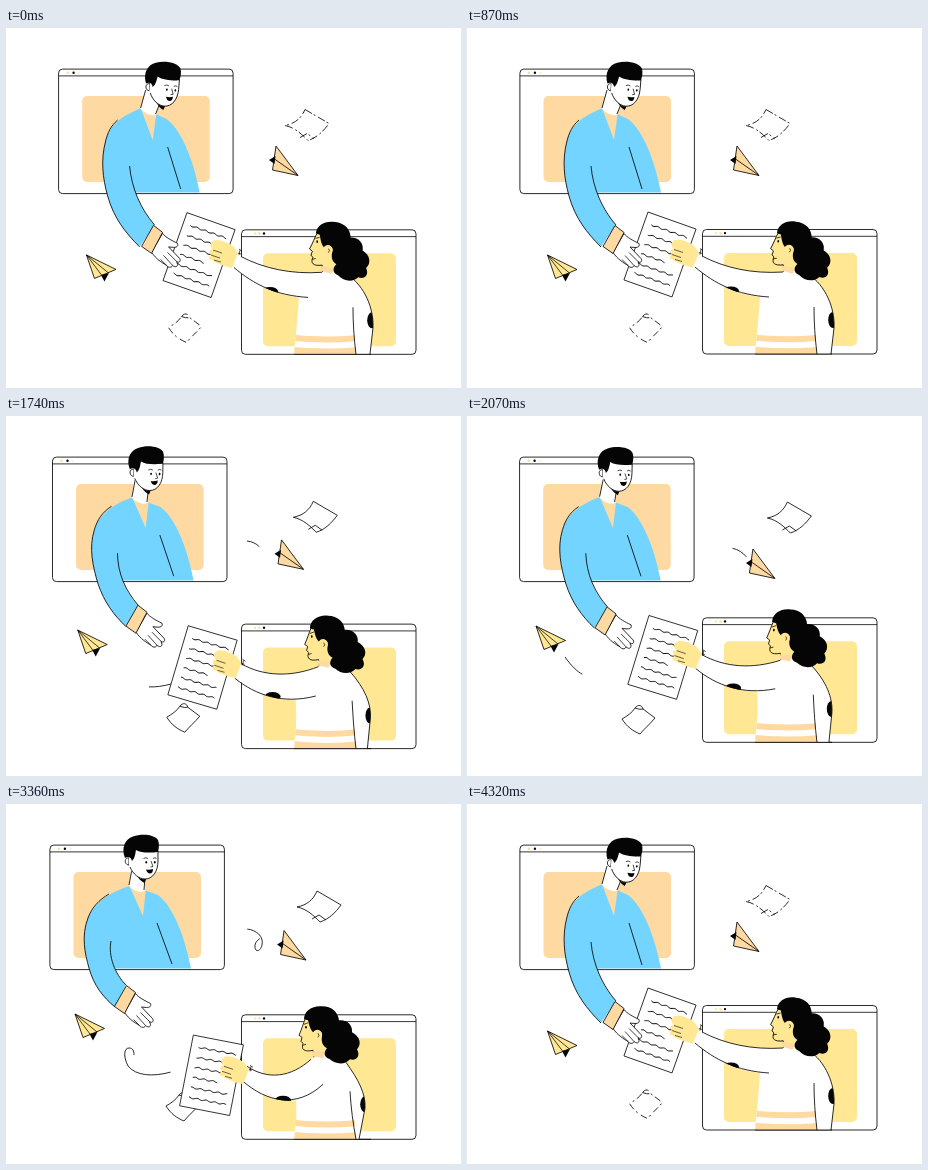
These frames come from a looping animation (455x360 px, 4.35 s). An HTML page with a canvas:

```html
<!DOCTYPE html>
<html lang="en">
<head>
<meta charset="utf-8">
<title>Sharing a document</title>
<style>
  html, body { margin: 0; width: 100%; height: 100%; overflow: hidden; background: #fff; }
  canvas { display: block; }
</style>
</head>
<body>
<canvas id="stage" width="455" height="360"></canvas>
<script>
const ctx = document.getElementById('stage').getContext('2d');
const LOOP = 4350, CYCLE = 1520;
const INK = '#050505', BLUE = '#72d4ff', PEACH = '#ffd9a2', YELLOW = '#ffe794', WHITE = '#fff';

// Keyframe tracks: rows of [time, value, value...]
const SLIDE = [[0, .03], [105, .55], [210, .68], [320, 1], [370, 1.03], [510, .1], [560, .02], [640, 0]];
const REACH = [[0, .01], [105, .35], [210, .75], [320, 2], [360, 2], [510, 1], [550, .7], [640, .22], [740, 0]];
const DART_R = [[0, -15.5, -15], [320, -7.5, -6.5], [500, 0, 0], [560, .5, 0], [760, -15.5, -15]];
const DART_L = [[0, 11.5, 17], [290, 0, 0], [570, 0, 0], [760, 11.5, 17]];
const PAGE_R = [[0, -21, -4.5], [320, -9, 1], [500, 0, 0], [570, .5, 0], [760, -21, -4.5]];
const PAGE_L = [[0, 7.5, -3.5], [320, 5, -1], [500, 0, 0], [570, 0, 0], [760, 7.5, -3.5]];
const TAIL = [[180, 0, 0], [320, 0, .62], [430, .4, 1], [510, .66, 1], [550, .78, 1], [640, 1, 1]];

// Poses: together, parted, far apart
const MAN_BODY = [
  'M136 80 C118 87 104 96 100 113 C95 132 97 150 102 168 C108 190 120 205 134 219 L149 197 C140 187 134 176 130 164.6 L194 164.6 C189 138 178 104 161 91 L150 86 Z',
  'M133 81 C116 87 100 96 94 114 C88 132 93 152 98 168 C104 185 113 198 125 209 L137 188 C130 181 125 173 122 164.6 L194 164.6 C189 138 178 104 161 91 L147 86 Z',
  'M133 82 C116 87 98 97 91 114 C84 132 88 150 92 164 C97 182 106 193 118 203 L129 181 C124 176 120 171 118 164.6 L194 164.6 C189 138 178 104 161 91 L147 86 Z'];
const MAN_LINES = [
  'M112 92 C105 98 102 105 100 113 C95 132 97 150 102 168 C108 190 120 205 134 219 M149 197 C135 181 126 160 124 138 M162 119 L175 161',
  'M112 90 C102 96 97 104 94 114 C88 132 93 152 98 168 C104 185 113 198 125 209 M137 188 C125 174 117 158 117 137 M160 119 L174 160',
  'M112 90 C102 96 95 103 91 114 C84 132 88 150 92 164 C97 182 106 193 118 203 M129 181 C118 170 111 152 114 137 M160 119 L175 160'];
const NECK = [
  'M140 62 L135 81 C140 86 146 88 150 87 L154 76 Z',
  'M134 60 L132 82 C137 87 143 89 148 87 L148 72 Z',
  'M134 61 L132 82 C137 87 143 89 148 87 L148 73 Z'];
const NECK_LINES = [
  'M140 62 L135 80 M154 76 L150 86',
  'M135 64 L132 81 M148 73 L147 86',
  'M135 65 L132 81 M148 74 L147 86'];
const COLLAR = [
  'M135 80 L151 84 L147 112 Z',
  'M132 81 L149 84 L146 112 Z',
  'M132 81 L149 84 L146 112 Z'];
const MAN_HEAD = [[12.5, 4, 5], [.8, 0, 0], [0, 1, 0]];
const MAN_HAND = [[11, 9.5], [0, 0], [-7.5, -6.5]];
const GIRL_BODY = [
  'M235 228 C258 240 285 246 316 244 L322 241 L344 248 C362 262 368 285 367 300 L364 326 L288 326 C290 305 292 285 293 269 C268 266 248 256 228 239 Z',
  'M235 243 C258 256 285 256 312 244 L320 240 L344 249 C358 266 365 280 364 295 L361 326 L288 326 C290 308 291 292 289 278 C266 280 247 270 229 258 Z',
  'M241 253 C262 267 285 264 305 246 L316 240 L340 249 C352 266 360 280 359 295 L353 326 L288 326 C290 312 291 300 290 287 C270 290 255 281 237 268 Z'];
const GIRL_LINES = [
  'M235 228 C258 240 285 246 316 244 M228 239 C248 256 270 267 302 269 M344 248 C362 262 368 285 367 300 L364 326 M347 279 C347 295 348 310 350 326',
  'M235 243 C258 256 285 256 312 244 M229 258 C250 275 278 284 311 274 M344 249 C358 266 365 280 364 295 L361 326 M346 278 C347 295 348 310 350 326',
  'M241 253 C262 267 285 264 305 246 M237 268 C260 288 290 296 317 271 M340 249 C352 266 360 280 359 295 L353 326 M344 278 C345 295 347 310 350 326'];
const GIRL_HEAD = [[5.5, 1, 5], [0, 0, 0], [-5, 0, 0]];
const GIRL_HAND = [[-4, -18.5], [0, 0], [7, 13]];
const PATCHES = [[264, 263, 366, 292], [267, 275.5, 364, 293], [277, 287, 359, 291]];
const SHEET = [[193, 226.5, 19.5], [197, 247.5, 16], [205.5, 262, 11]];

function track(t, rows) {
  if (t <= rows[0][0]) return rows[0].slice(1);
  for (let i = 1; i < rows.length; i++) {
    const a = rows[i - 1], b = rows[i];
    if (t < b[0]) return a.slice(1).map((v, k) => v + (b[k + 1] - v) * (t - a[0]) / (b[0] - a[0]));
  }
  return rows[rows.length - 1].slice(1);
}

function pose(list, r) {
  const i = r < 1 ? 0 : 1;
  return list[i].map((v, k) => v + (list[i + 1][k] - v) * (r - i));
}

function posePath(list, r) {
  const i = r < 1 ? 0 : 1, next = list[i + 1].match(/[\d.]+/g);
  let k = 0;
  return list[i].replace(/[\d.]+/g, v => (+v + (next[k++] - v) * (r - i)).toFixed(2));
}

function fill(d, color) { ctx.fillStyle = color; ctx.fill(new Path2D(d)); }
function line(d, width = .85) { ctx.lineWidth = width; ctx.strokeStyle = INK; ctx.stroke(new Path2D(d)); }
function shape(d, color, width) { fill(d, color); line(d, width); }
function oval(x, y, rx, ry, color) {
  ctx.beginPath();
  ctx.ellipse(x, y, rx, ry, 0, 0, 7);
  ctx.fillStyle = color;
  ctx.fill();
}
function at([x, y, deg = 0], draw, px = 0, py = 0) {
  ctx.save();
  ctx.translate(x + px, y + py);
  ctx.rotate(deg * Math.PI / 180);
  ctx.translate(-px, -py);
  draw();
  ctx.restore();
}
function box(x, y, w, h, r, color) {
  ctx.beginPath();
  ctx.roundRect(x, y, w, h, r);
  ctx.fillStyle = color;
  ctx.fill();
}

function frameWindow(x, y, dots) {
  box(x, y, 174.5, 124.5, 4, WHITE);
  ctx.strokeStyle = INK;
  ctx.lineWidth = .85;
  ctx.stroke();
  line(`M${x} ${y + 6.8} h174.5`, .8);
  dots.forEach(([dx, c]) => oval(x + dx, y + 3.6, 1.2, 1.2, c));
}

function manHead() {
  shape('M132 60 C127 60 127 52 132 53 Z', WHITE);
  fill('M132 44 L132 61 C134 68 141 74 148 74 C156 74 161 66 161 56 L161 42 Z', WHITE);
  line('M133 62 C136 69 142 74 148 74 C156 74 161 66 161 56 L161 46');
  fill('M128 53 C124 43 128 34 136 31.5 C146 28 158 30 161 35 C162.500 39 162 43 161 47 C152 48 144 48 139 45 C138 50 138 53 135 56 C134 52 131 51 128 53 Z', INK);
  line('M146.500 53.500 Q149 52 151 53.500 M156 53.500 Q158 52 159.500 53.500 M154 56 L156 61.500 L153.500 62', .7);
  oval(149.3, 57.3, .9, 1.2, INK);
  oval(157.8, 57.3, .9, 1.2, INK);
  fill('M149 64.500 Q152.500 65 156 64 Q156 68.500 152.500 68.500 Q150 68 149 64.500 Z', INK);
  fill('M140 71 C143 74 146 74.500 149 74 L147.500 78 C144 76 142 74 140 71 Z', INK);
}

function manHand() {
  shape('M146 196 C149 200 155 203 161 206 C162 209 160 210 157 210 L152 209.500 L163 221 C165 224 162 226 160 224 L161 227 C161 230 158 230 156 228 C155 231 151 230 150 228 C145 225 140 222 135 215 Z', WHITE);
  line('M160 224 L151 215 M156 228 L147 218 M150 228 L144 222', .75);
  shape('M137 188 L146 195 L135 216 L125 209 Z', PEACH);
}

function girlFace() {
  fill('M307 202 C302 207 302 212 300 216 L298 222 L301 224 L300 228 L302 230 C300 236 303 239 311 238 L312 246 L326 246 L328 212 Z', YELLOW);
  line('M304 206 C302 211 301 215 298 222 L301 224 L300 228 L302 230 C300 236 303 239 312 237 L313 244');
  line('M303 211 L307 209.500 M301.500 232 L305 231', .75);
  oval(305, 214, .9, 1.3, INK);
}

function girlHair() {
  fill('M303 206 C303 197 312 192 321 193 C331 193 337 199 338 207 C346 206 352 212 351 219 C359 223 361 231 356 236 C360 243 355 248 349 246 C344 252 334 251 329 246 C322 244 323 238 326 235 C319 231 321 225 321 220 C319 216 315 215 312 219 C309 216 308 211 307 207 Z', INK);
  fill('M314 219 C317 215 322 218 321 223 C320 227 315 228 313 225', YELLOW);
  line('M317 220 Q319 222 317 224', .7);
}

function girlHand() {
  fill('M213 230 C220 230 226 233 231 236 L236 243 L230 258 C223 256 214 254 210 250 C206 250 206 247 209 245 C206 242 207 239 211 240 C207 236 208 232 213 230 Z', YELLOW);
  line('M211 240 L220 243 M209 245 L218 248 M212 250 L219 252', .6);
  line('M237 239 l3 2 M236 243 l3 1 m-1 -4 l-1 5', .7);
}

function sheet() {
  shape('M-25.500 -36 h51 v72 h-51 Z', WHITE, .75);
  [38, 37, 38, 25, 37, 38].forEach((w, i) => {
    ctx.beginPath();
    for (let x = 0; x <= w; x++) ctx.lineTo(x - 18, -25 + i * 10.2 + Math.sin(x * .7 + i) * .65);
    ctx.lineWidth = .9;
    ctx.stroke();
  });
}

function trail(d, [from, to], length) {
  if (to - from < .01) return;
  ctx.setLineDash([0, from * length, (to - from) * length, length * 2]);
  line(d);
  ctx.setLineDash([]);
}

function floaters(t) {
  const dashed = t < 130 || t > 700;
  const tail = track(t, TAIL);
  const page = (pos, d, extra, dash) => at(track(t, pos), () => {
    fill(d, WHITE);
    if (dashed) ctx.setLineDash(dash);
    line(d);
    line(extra);
  });
  page(PAGE_R, 'M320 86 L344 100 C338 108 332 114 323 117 C317 111 310 104 300 102 C310 100 316 95 320 86 Z',
    'M315 114 L322 110 L329 115', [8, 2, 2, 3]);
  page(PAGE_L, 'M168 292 C171 288 175 289 176 293 L188 302 C183 308 178 312 173 318 C166 315 160 311 155 303 C160 300 165 297 168 292 Z',
    'M168 292 Q173 294 176 293', [7, 4, 2, 3]);
  trail('M165 268 C147 273 130 272 122 262 C117 252 118 244 123 244 C127 244 128 247 128 251 C129 265 114 264 98 241', tail, 122);
  trail('M241 125 C250 126 258 132 256 141 C254 149 248 148 249 141 C250 135 258 132 262 132 C270 132 277 137 281 143', tail, 76);
  at(track(t, DART_L), () => {
    shape('M69 210 L98.500 224.500 L77 233.500 Z', YELLOW);
    line('M69 210 L84 230 M69 210 L91 228', .75);
    fill('M83.500 230 L91.500 228 L87 236.500 Z', INK);
  });
  at(track(t, DART_R), () => {
    shape('M285.500 133 L307.500 162.500 L282 157 Z', PEACH);
    line('M307.500 162.500 L284 146');
    fill('M278.500 147 L285 143 L284 151 Z', INK);
  });
}

function man(r) {
  frameWindow(52.9, 41.1, [[9, PEACH], [15, INK], [20.5, '#fff1d8']]);
  box(76.5, 68, 127.5, 86, 5, PEACH);
  fill(posePath(MAN_BODY, r), BLUE);
  fill(posePath(COLLAR, r), PEACH);
  fill(posePath(NECK, r), WHITE);
  line(posePath(NECK_LINES, r));
  line(posePath(MAN_LINES, r));
  at(pose(MAN_HEAD, r), manHead, 145, 52);
}

function girl(r) {
  frameWindow(235.5, 201.5, [[13.5, YELLOW], [18, PEACH], [22.5, INK]]);
  box(257, 225, 133, 93, 5, YELLOW);
  const head = pose(GIRL_HEAD, r), body = posePath(GIRL_BODY, r);
  const [ex, ey, sx, sy] = pose(PATCHES, r);
  at(head, girlFace, 325, 222);
  fill(body, WHITE);
  ctx.save();
  ctx.clip(new Path2D(body));
  fill('M280 306 Q318 310 349 307 L349 313 Q318 316 280 312 Z M280 318 Q318 322 350 319 L350 326 H280 Z', PEACH);
  oval(ex, ey, 8, 4.5, INK);
  oval(sx, sy, 4.8, 8, INK);
  ctx.restore();
  line(posePath(GIRL_LINES, r));
  line('M288 326 H365');
  at(head, () => {
    fill('M311 238 L325 239 L322 245 L312 243 Z', PEACH);
    girlHair();
  }, 325, 222);
}

function draw(now) {
  const t = now % LOOP % CYCLE;
  const [w] = track(t, SLIDE), [r] = track(t, REACH);
  const left = [-9 * w, 0], down = [0, 9.3 * w];
  ctx.fillStyle = WHITE;
  ctx.fillRect(0, 0, 455, 360);
  ctx.lineCap = 'butt';
  ctx.lineJoin = 'round';
  at(left, () => man(r));
  floaters(t);
  at(down, () => girl(r));
  at(down, () => at(pose(SHEET, r), sheet));
  at(left, () => at(pose(MAN_HAND, r), manHand));
  at(down, () => at(pose(GIRL_HAND, r), girlHand));
}

const start = performance.now();
function tick() {
  draw(performance.now() - start);
  requestAnimationFrame(tick);
}
tick();
</script>
</body>
</html>
```
